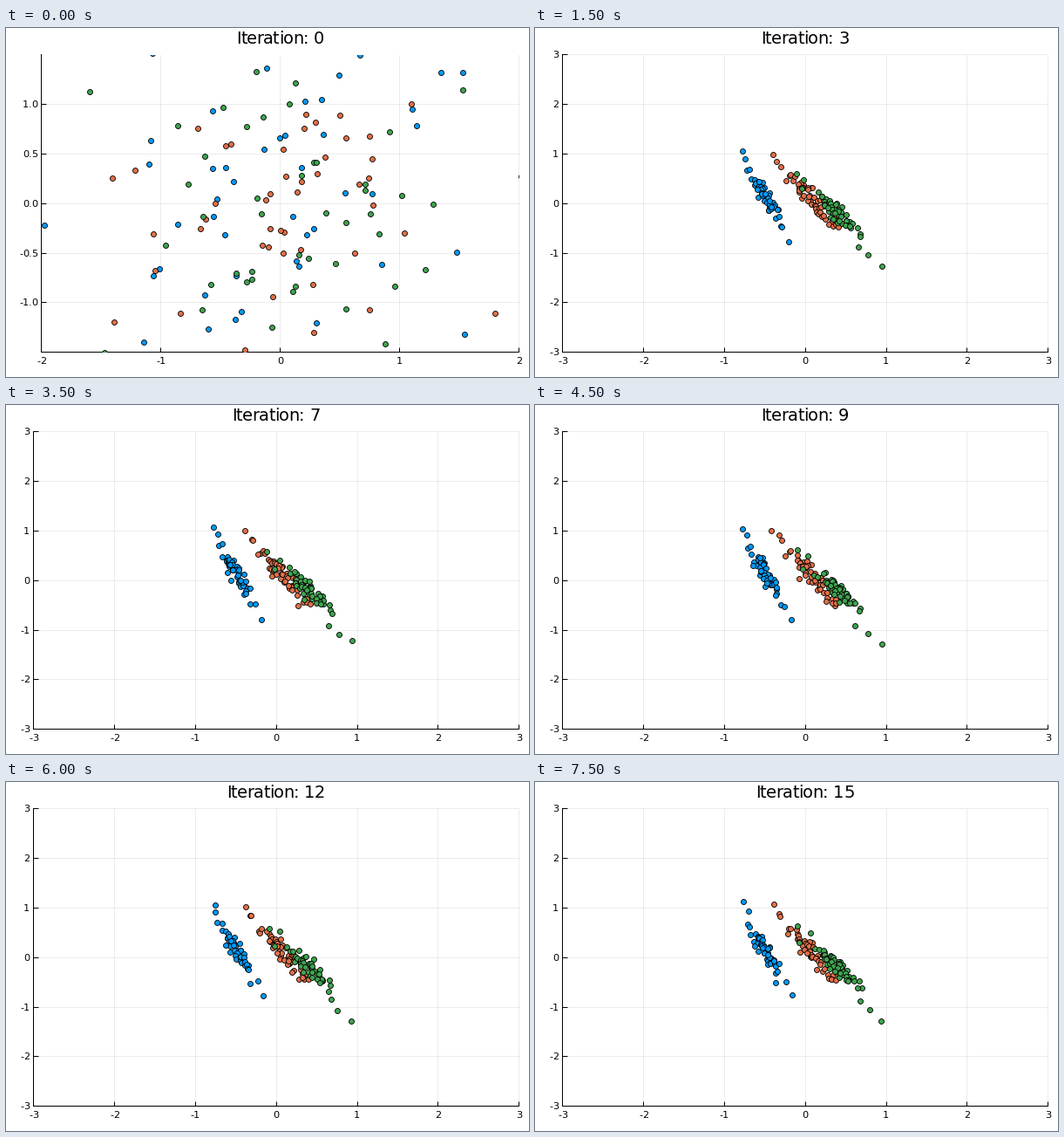
Animation of 600x400 px, one loop 8 s. Source, as a matplotlib script:

```python
import math

import matplotlib.pyplot as plt
import numpy as np
from matplotlib.animation import FuncAnimation
from matplotlib.textpath import TextPath

W, H = 600, 400
PX = 0.72  # points per pixel at 100 dpi
TOP, BOTTOM, RIGHT = 30.5, 371.2, 588.3
N = 50  # points per class

# Per class: colour, spread across the spine, and the spine itself
# (first point, both ends of the dense part, last point)
CLASSES = [
    ("#009afa", (.035, .06), [(-.77, 1.07), (-.63, .52), (-.36, -.20), (-.19, -.77)]),
    ("#e36f47", (.045, .06), [(-.40, 1.03), (-.16, .54), (.30, -.32), (.39, -.47)]),
    ("#3ea44e", (.065, .06), [(-.10, .61), (.18, .13), (.63, -.54), (.95, -1.27)]),
]

plt.rcParams["font.family"] = "DejaVu Sans"


def cluster(spread, spine, seed):
    """Points along the spine, dense in the middle and sparse at the ends."""
    u = np.linspace(-1, 1, N)
    t = u * (1 + u ** 8) / 2
    line = [np.interp(t, [-1, -.5, .5, 1], axis) for axis in zip(*spine)]
    noise = np.random.default_rng(seed).normal(0, spread, (N, 2))
    return np.column_stack(line) + noise * (1 - u[:, None] ** 20)


def points(c, k):
    rng = np.random.default_rng(100 * k + c)
    if k == 0:
        return rng.normal(0, (.85, 1), (N, 2))
    _, spread, spine = CLASSES[c]
    settle = .1 ** (k - 1)
    p = cluster(spread, spine, 40 + c) + rng.normal(0, (.018, .03), (N, 2))
    return p * (1, 1 + .36 * settle) - (.1 * settle, 0)


def advance(ch, size):
    end = TextPath((0, 0), ch + "|", size).get_extents().x1
    return math.floor(end - TextPath((0, 0), "|", size).get_extents().x1)


def write(fig, x, base, s, size, align):
    """Set text on whole-pixel advances; align is 0 left, 0.5 centre, 1 right."""
    steps = [advance(ch, size) for ch in s]
    x = round(x - align * sum(steps))
    for ch, step in zip(s, steps):
        fig.text(x / W, 1 - base / H, ch, fontsize=size * PX, va="baseline")
        x += step


def draw(k):
    fig.clear()
    if k == 0:
        left, xlim, ylim = 40.3, 2, 1.5
        xticks, yticks, fmt = range(-2, 3), np.arange(-1, 1.1, .5), "{:.1f}"
    else:
        left, xlim, ylim = 31.3, 3, 3
        xticks = yticks = range(-3, 4)
        fmt = "{}"

    ax = fig.add_axes([left / W, 1 - BOTTOM / H, (RIGHT - left) / W, (BOTTOM - TOP) / H])
    ax.set(xlim=(-xlim, xlim), ylim=(-ylim, ylim), xticks=xticks, yticks=yticks)
    ax.spines[["top", "right"]].set_visible(False)
    ax.spines[["left", "bottom"]].set_linewidth(PX)
    ax.tick_params(direction="in", length=5.5 * PX, width=PX,
                   labelleft=False, labelbottom=False)
    ax.set_axisbelow(True)
    ax.grid(color="black", alpha=.075, linewidth=PX, clip_on=False)

    for c, (color, *_) in enumerate(CLASSES):
        x, y = points(c, k).T
        ax.scatter(x, y, s=(6 * PX) ** 2, c=color, edgecolors="black",
                   linewidths=.85 * PX, zorder=3 + c)

    mid = (left + RIGHT) / 2
    for v in xticks:
        write(fig, mid + v / xlim * (RIGHT - left) / 2, 385, str(v), 11.4, .5)
    for v in yticks:
        y = (TOP + BOTTOM) / 2 - v / ylim * (BOTTOM - TOP) / 2
        write(fig, left - 4, round(y + 4), fmt.format(v), 11.4, 1)
    write(fig, mid, 18, f"Iteration: {k}", 19.5, .5)
    return []


fig = plt.figure(figsize=(W / 100, H / 100), dpi=100, facecolor="white")
anim = FuncAnimation(fig, draw, frames=16, init_func=lambda: draw(0),
                     interval=500, repeat=True, repeat_delay=0)
plt.show()
```
